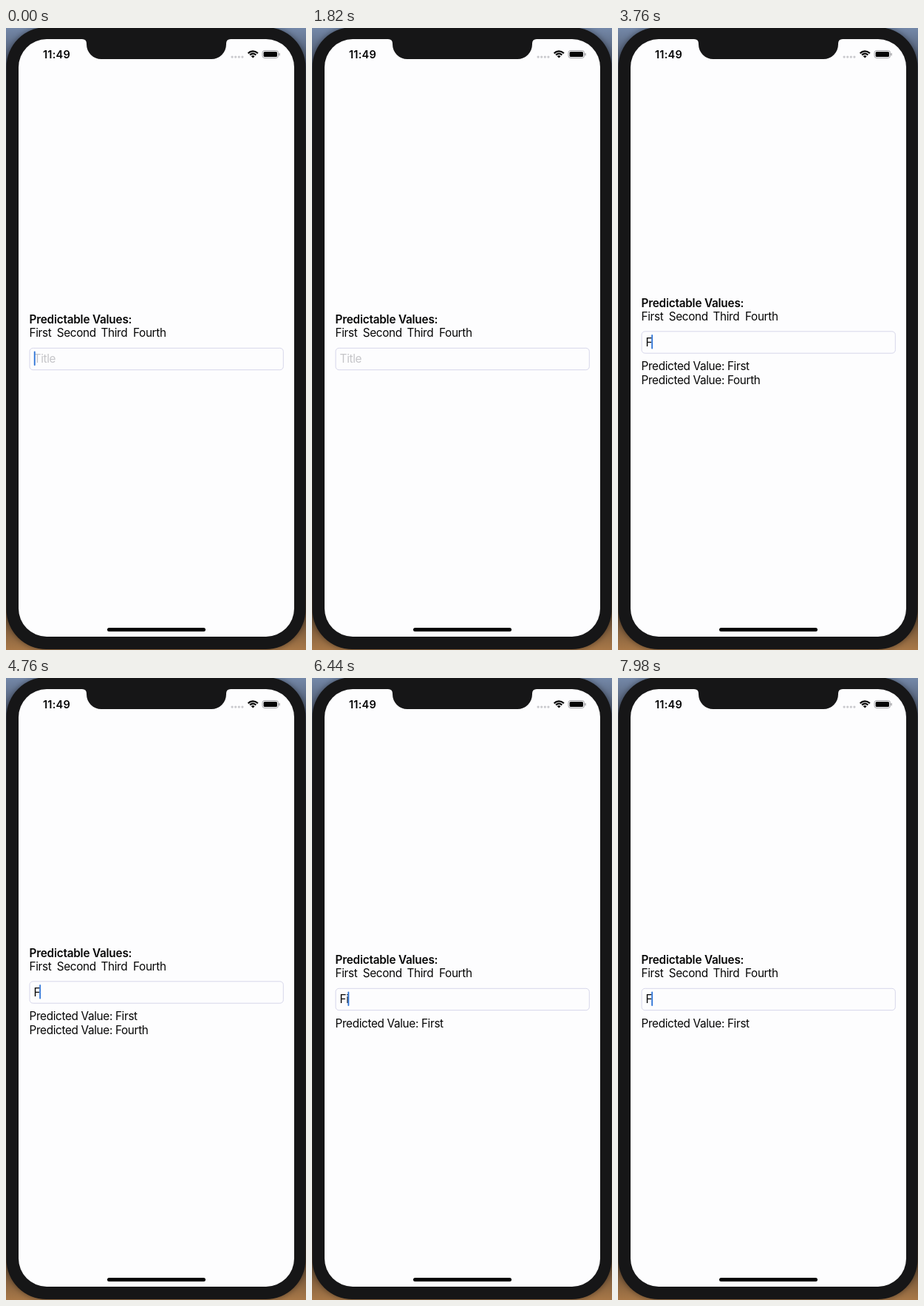
An HTML page with a canvas that plays this animation: 406x840 px, repeating every 8 s.

```html
<!DOCTYPE html>
<html lang="en">
<head>
<meta charset="utf-8">
<title>Predictive text field</title>
<style>
  html, body { margin: 0; width: 100%; height: 100%; overflow: hidden; background: #161617; }
  canvas { display: block; width: 406px; height: 840px; }
</style>
</head>
<body>
<canvas id="stage"></canvas>
<script>
const W = 406, H = 840, LOOP = 8000;
const INK = '#050505', PAPER = '#fdfdfe', BEZEL = '#161617';
const FONT = 'Inter, "Liberation Sans", sans-serif';
const canvas = document.getElementById('stage');
const ctx = canvas.getContext('2d');
const scale = window.devicePixelRatio || 1;
canvas.width = W * scale;
canvas.height = H * scale;

// Each list holds [start time, value]; the last started entry applies.
const typed = [[0, ''], [2660, 'F'], [5660, 'Fi'], [7900, 'F']];
const hints = [[0, []], [3640, ['First', 'Fourth']], [6040, ['First']]];
const caretX = { '': 37.8, F: 45.2, Fi: 48.4 };
const shifts = [0, -13, -22.5];

// Caret fades: [start, duration, opacity reached]
const fades = [
  [20, 240, 0], [840, 200, 1], [1320, 240, 0], [2360, 180, 1],
  [3840, 220, 0], [4600, 180, 1], [5320, 180, 0], [5660, 1, 1],
  [6600, 240, 0], [7680, 180, 1]
];

function at(list, t) {
  let value = list[0][1];
  for (const [start, v] of list) if (t >= start) value = v;
  return value;
}

function caretAlpha(t) {
  let alpha = 1;
  for (const [start, length, goal] of fades) {
    const p = Math.min(1, Math.max(0, (t - start) / length));
    alpha += (goal - alpha) * p * p * (3 - 2 * p);
  }
  return alpha;
}

function box(x, y, w, h, r, color) {
  ctx.beginPath();
  ctx.roundRect(x, y, w, h, r);
  ctx.fillStyle = color;
  ctx.fill();
}

function label(str, x, y, { size = 15.3, weight = 400, color = INK, track = -0.34 } = {}) {
  ctx.font = `${weight} ${size}px ${FONT}`;
  ctx.letterSpacing = track + 'px';
  ctx.fillStyle = color;
  ctx.fillText(str, x, y);
}

function drawPhone() {
  const wall = ctx.createLinearGradient(0, 0, 0, H);
  wall.addColorStop(0, '#7488a8');
  wall.addColorStop(0.06, '#4a5468');
  wall.addColorStop(0.2, '#2c3038');
  wall.addColorStop(0.9, '#3a3028');
  wall.addColorStop(1, '#a87848');
  ctx.fillStyle = wall;
  ctx.fillRect(0, 0, W, H);
  ctx.save();
  ctx.shadowColor = 'rgba(0, 0, 0, 0.45)';
  ctx.shadowBlur = 8 * scale;
  box(0.5, -1, 405, 840, 54, BEZEL);
  ctx.restore();
  box(17, 15, 373, 807, 38, PAPER);

  // Notch with flared shoulders
  ctx.beginPath();
  ctx.moveTo(103, 14);
  ctx.lineTo(103, 15);
  ctx.quadraticCurveTo(109, 15, 109, 21);
  ctx.arcTo(109, 42, 130, 42, 20);
  ctx.lineTo(278, 42);
  ctx.arcTo(298, 42, 298, 21, 20);
  ctx.lineTo(298, 21);
  ctx.quadraticCurveTo(298, 15, 304, 15);
  ctx.lineTo(304, 14);
  ctx.closePath();
  ctx.fillStyle = BEZEL;
  ctx.fill();

  box(137, 810, 133, 5, 2.5, '#000');
}

function drawStatus() {
  label('11:49', 50, 40.6, { size: 14.6, weight: 600, track: 0.2 });
  for (let i = 0; i < 4; i++) box(304.5 + i * 4.6, 37.5, 3.2, 3.2, 1.6, '#c9c9cd');

  // Wi-Fi: two arcs above a small wedge
  ctx.strokeStyle = INK;
  ctx.lineWidth = 2.2;
  for (const r of [9, 5.6]) {
    ctx.beginPath();
    ctx.arc(334.2, 40.3, r, -Math.PI * 0.76, -Math.PI * 0.24);
    ctx.stroke();
  }
  ctx.beginPath();
  ctx.moveTo(334.2, 40.6);
  ctx.arc(334.2, 40.6, 3.3, -Math.PI * 0.76, -Math.PI * 0.24);
  ctx.closePath();
  ctx.fillStyle = INK;
  ctx.fill();

  ctx.beginPath();
  ctx.roundRect(347, 30.5, 21.5, 10, 3);
  ctx.strokeStyle = '#a4a4a8';
  ctx.lineWidth = 1;
  ctx.stroke();
  box(348.6, 32, 18.4, 7, 1.6, INK);
  box(369.3, 33.7, 1.4, 3.8, 0.7, '#a4a4a8');
}

function drawForm(t) {
  const text = at(typed, t);
  const found = at(hints, t);

  ctx.save();
  ctx.translate(0, shifts[found.length]);
  label('Predictable Values:', 31.5, 399, { weight: 600, track: -0.2 });
  const words = [['First', 31.5], ['Second', 68.7], ['Third', 128.5], ['Fourth', 172]];
  for (const [word, x] of words) label(word, x, 417);

  ctx.beginPath();
  ctx.roundRect(32, 432.3, 343.3, 29.4, 4.5);
  ctx.strokeStyle = '#d6d6ea';
  ctx.lineWidth = 1;
  ctx.stroke();

  if (text) label(text, 37.6, 452.2);
  else label('Title', 37.6, 452.2, { color: '#c5c5c8' });

  ctx.globalAlpha = caretAlpha(t);
  box(caretX[text], 436.5, 1.9, 19.5, 0.9, '#3478d8');
  ctx.globalAlpha = 1;

  found.forEach((word, i) => label('Predicted Value: ' + word, 31.5, 484.7 + i * 18.4));
  ctx.restore();
}

function draw(now) {
  ctx.setTransform(scale, 0, 0, scale, 0, 0);
  drawPhone();
  drawStatus();
  drawForm(now % LOOP);
}

const began = performance.now();
function tick() {
  draw(performance.now() - began);
  requestAnimationFrame(tick);
}
tick();
</script>
</body>
</html>
```
